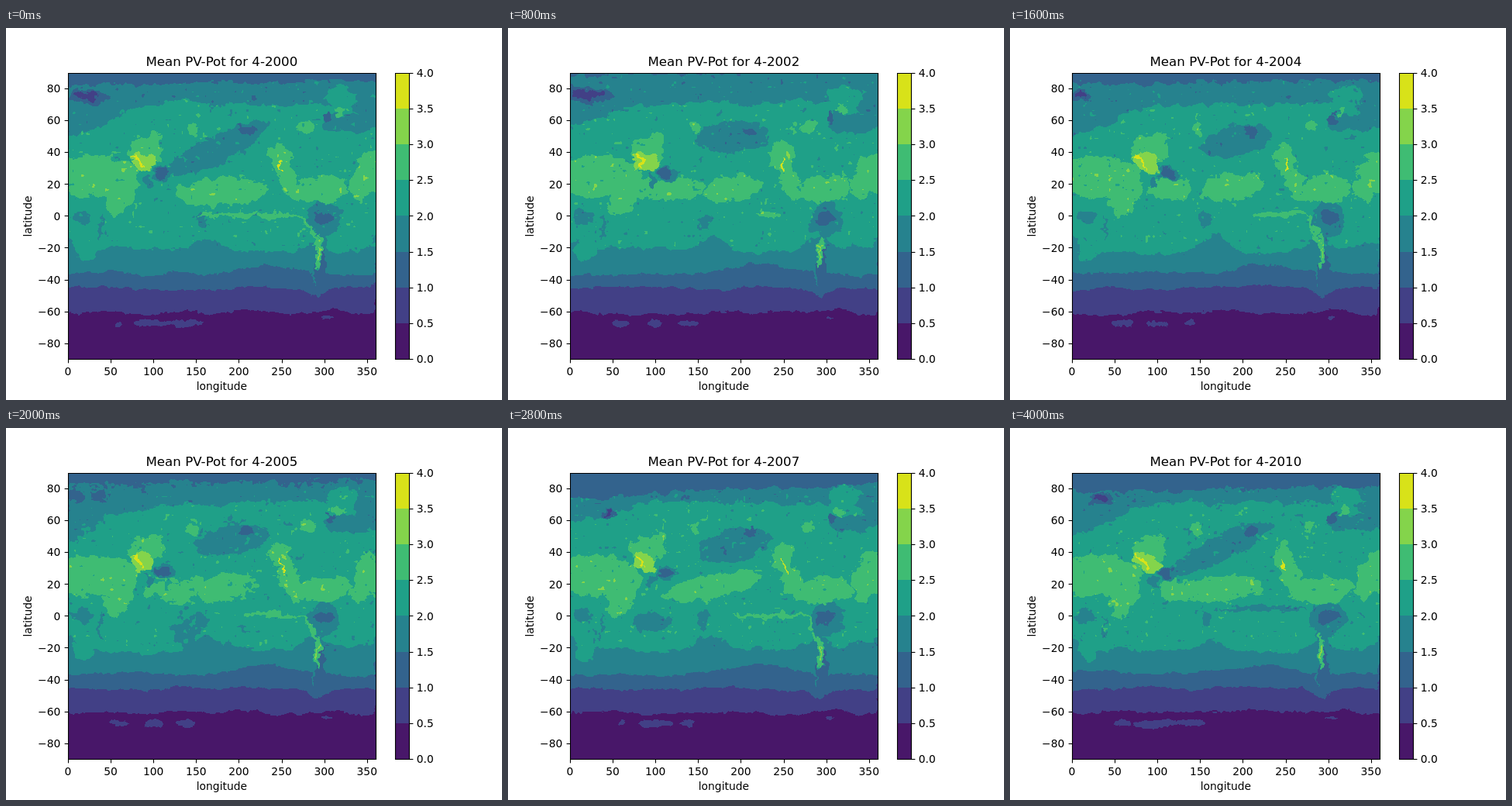
Write an HTML page with a canvas that moves like this. It is 640 by 480 pixels and loops after 4400 ms.

```html
<!DOCTYPE html>
<html lang="en">
<head>
<meta charset="utf-8">
<title>Mean PV-Pot</title>
<style>
html, body { margin: 0; width: 100%; height: 100%; overflow: hidden; background: #fff; }
canvas, svg { position: absolute; left: 0; top: 0; }
canvas { left: 80px; top: 58px; }
text { font-family: "DejaVu Sans", sans-serif; font-size: 13.89px; fill: #000; }
.title { font-size: 16.67px; }
.mid { text-anchor: middle; }
.end { text-anchor: end; }
.line { fill: none; stroke: #000; stroke-width: 1.1; }
</style>
</head>
<body>
<canvas id="map" width="398" height="370"></canvas>
<svg id="plot" width="640" height="480" viewBox="0 0 640 480"></svg>
<script>
const W = 398, H = 370, LEFT = 80, TOP = 58, STEP = 400, FIRST = 2000, YEARS = 11, GREY = 30;
const COLORS = ['#481769', '#424086', '#33638d', '#26828e', '#1fa088', '#3fbc73', '#84d44b', '#d8e219'];
const RGB = COLORS.map(c => [1, 3, 5].map(i => parseInt(c.slice(i, i + 2), 16)));

// Features seen every year: level, centre, radii, tilt.
const africaAsia = [
  [4, 101, 283, 14, 18], [3, 97, 243, 12, 9], [3, 122, 258, 2, 18],
  [5, 112, 191, 58, 27], [5, 150, 210, 18, 36, .35],
  [5, 180, 158, 23, 17], [5, 193, 143, 10, 8], [3, 185, 198, 5, 8],
  [3, 205, 187, 13, 10], [2, 203, 187, 8, 7],
  [6, 177, 173, 17, 12, .4], [7, 170, 172, 11, 2, .9]
];
const americas = [
  [3, 411, 246, 22, 22], [3, 403, 298, 9, 42], [2, 405, 316, 7, 33], [2, 411, 245, 12, 8],
  [5, 402, 289, 4, 23], [6, 402, 290, 1.5, 9],
  [5, 353, 166, 14, 18], [5, 366, 197, 12, 28, -.4], [7, 355, 178, 1.5, 10, -.3],
  [5, 408, 208, 36, 17, -.1], [5, 463, 192, 15, 34, .3], [5, 477, 188, 12, 26]
];
const arctic = [
  [4, 434, 90, 20, 15], [3, 452, 123, 22, 12], [3, 425, 122, 14, 12], [2, 417, 116, 5, 7],
  [5, 430, 107, 6, 6], [5, 388, 128, 9, 7], [5, 240, 131, 6, 7]
];

// drop: extra depth of the northern edge on the left; cap: polar edge, left and right;
// belt: Pacific high; west: width of its western part; strip: equatorial line;
// swath: cloudy mid-latitudes; polar: dark arctic patch; ice: widths of the southern patches.
const MAPS = {};
const year = (n, map) => MAPS[n] = map;
year(2000, { drop: 45, cap: [75, 67], belt: [277, 211, 59, 18, -.08], west: 0, strip: [249, 386],
  swath: [274, 156, 74, 18, -.45], polar: [105, 89, 25, 9], ice: [4, 24, 20] });
year(2002, { drop: 30, cap: [62, 54], belt: [290, 207, 37, 16, -.25], west: 48, strip: [325, 352],
  swath: [290, 141, 48, 20, -.1], polar: [103, 88, 36, 10], ice: [12, 11, 14] });
year(2004, { drop: 40, cap: [73, 67], belt: [287, 206, 42, 18, -.1], west: 28, strip: [310, 386],
  swath: [291, 146, 46, 19, -.2], polar: [90, 87, 14, 9], ice: [13, 14, 8] });
year(2006, { drop: 50, cap: [79, 73], belt: [258, 207, 60, 17, -.2], west: 0, strip: [270, 386],
  swath: [290, 142, 49, 23, -.1], polar: [123, 87, 11, 8], ice: [11, 8, 14],
  extra: [3, 234, 263, 18, 32] });
year(2007, { drop: 25, cap: [91, 70], belt: [263, 204, 63, 16, -.2], west: 0, strip: [284, 386],
  swath: [292, 151, 48, 20, -.2], polar: [131, 111, 9, 6], ice: [3, 22, 8],
  extra: [3, 186, 251, 26, 12] });
year(2009, { drop: 45, cap: [75, 68], belt: [263, 204, 44, 19, -.3], west: 0, strip: [274, 387],
  swath: [300, 148, 41, 28, -.2], polar: [90, 86, 13, 9], ice: [11, 18, 13] });
year(2010, { drop: 40, cap: [82, 76], belt: [265, 208, 62, 16, -.1], west: 15, strip: [270, 386], wet: true,
  swath: [273, 155, 76, 16, -.45], polar: [118, 92, 16, 8], ice: [12, 28, 20] });

function random(seed) {
  return () => {
    seed = seed + 0x6D2B79F5 | 0;
    let t = Math.imul(seed ^ seed >>> 15, seed | 1);
    t ^= t + Math.imul(t ^ t >>> 7, t | 61);
    return ((t ^ t >>> 14) >>> 0) / 4294967296;
  };
}

function noiseField(seed) {
  const next = random(seed), grid = Float32Array.from({ length: 65536 }, () => next() * 2 - 1);
  const at = (a, b) => grid[(b & 255) << 8 | a & 255];
  return (x, y) => {
    const i = Math.floor(x), j = Math.floor(y);
    let u = x - i, v = y - j;
    u *= u * (3 - 2 * u);
    v *= v * (3 - 2 * v);
    const a = at(i, j), b = at(i, j + 1);
    const top = a + (at(i + 1, j) - a) * u, low = b + (at(i + 1, j + 1) - b) * u;
    return top + (low - top) * v;
  };
}

const clamp = (v, lo, hi) => Math.max(lo, Math.min(hi, v));
const bump = (x, at, width) => Math.exp(-(((x - at) / width) ** 2));

function setLevel(ctx, level) {
  const g = level * GREY;
  ctx.fillStyle = `rgb(${g},${g},${g})`;
}

function blob(ctx, [level, x, y, rx, ry, tilt = 0]) {
  setLevel(ctx, level);
  ctx.beginPath();
  ctx.ellipse(x, y, rx, ry, tilt, 0, 7);
  ctx.fill();
}

function fillAbove(ctx, level, edge) {
  setLevel(ctx, level);
  ctx.beginPath();
  ctx.moveTo(60, 40);
  for (let x = LEFT; x <= LEFT + W; x += 3) ctx.lineTo(x, edge(x));
  ctx.lineTo(500, 40);
  ctx.fill();
}

function drawBands(ctx, map, noise) {
  const wave = (x, row) => noise(x / 45, row);
  const [capLeft, capRight] = map.cap;
  fillAbove(ctx, 1, x => 368 - 5 * bump(x, 428, 16) - 3 * bump(x, 290, 50) + 3 * wave(x, 10));
  fillAbove(ctx, 2, x => 336 + 11 * bump(x, 402, 14) + 3 * wave(x, 20));
  fillAbove(ctx, 3, x => 317 - 12 * bump(x, 330, 45) + 3 * wave(x, 30));
  fillAbove(ctx, 4, x => 288 - 18 * bump(x, 80, 14) - 18 * bump(x, 262, 20)
    - 16 * bump(x, 398, 18) - 8 * bump(x, 477, 40) + 5 * wave(x, 40));
  fillAbove(ctx, 3, x => 97 + map.drop * bump(x, 80, 62) + 36 * bump(x, 480, 24) + 4 * wave(x, 50));
  fillAbove(ctx, 2, x => capLeft + (capRight - capLeft) * (x - LEFT) / W + 2 * wave(x, 60));
}

function drawYear(ctx, map) {
  const [from, to] = map.strip;
  const [px, py, prx, pry] = map.polar;
  blob(ctx, [5, ...map.belt]);
  blob(ctx, [5, 206, 208, map.west, 15]);
  blob(ctx, [3, ...map.swath]);
  blob(ctx, [2, 312, 133, 10, 6]);
  blob(ctx, [3, 253, 248, 8, 11]);
  if (map.extra) blob(ctx, map.extra);
  africaAsia.concat(americas, arctic).forEach(shape => blob(ctx, shape));
  blob(ctx, [map.wet ? 3 : 5, (from + to) / 2, map.wet ? 233 : 241.5, (to - from) / 2, 3.5]);
  if (to > 380 && !map.wet) blob(ctx, [5, 393, 262, 3, 23, -.35]);
  blob(ctx, [2, px, py, prx, pry]);
  blob(ctx, [1, px, py - 1, prx * .6, pry * .6]);
  map.ice.forEach((rx, i) => blob(ctx, [1, 146 + 43 * i, 381, rx, 3 + rx / 12]));
  blob(ctx, [1, 414, 374, 6, 2]);
}

function drawLevels(map, noise) {
  const canvas = document.createElement('canvas');
  canvas.width = W;
  canvas.height = H;
  const ctx = canvas.getContext('2d', { willReadFrequently: true });
  ctx.fillRect(0, 0, W, H);
  ctx.translate(-LEFT, -TOP);
  drawBands(ctx, map, noise);
  drawYear(ctx, map);
  return ctx.getImageData(0, 0, W, H).data;
}

// Years without a map of their own lie halfway between their neighbours.
function renderYear(n) {
  const noise = noiseField(n * 7919);
  const pair = MAPS[n] ? [n, n] : [n - 1, n + 1];
  const [a, b] = pair.map(y => drawLevels(MAPS[y], noise));
  const image = new ImageData(W, H);
  for (let y = 0; y < H; y++) {
    const south = clamp((y - 215) / 40, 0, 1);
    const wave = 5 - 2.5 * south, ripple = 2.6 - .8 * south, grain = .68 - .4 * south;
    for (let x = 0; x < W; x++) {
      const shift = o => wave * noise(x / 11 + o, y / 8 + o) + ripple * noise(x / 3.5 + o, y / 3 + 2 * o);
      const sx = clamp(Math.round(x + shift(0)), 0, W - 1);
      const sy = clamp(Math.round(y + .8 * shift(60)), 0, H - 1);
      const k = (sy * W + sx) * 4;
      let value = (a[k] + b[k]) / 2 / GREY;
      if (value > 2.4 && value < 5.4) {
        value += grain * (.7 * noise(x / 8 + 33, y / 6 + 110) + .4 * noise(x / 3 + 7, y / 3 + 61));
      }
      image.data.set([...RGB[clamp(Math.round(value), 0, 7)], 255], (y * W + x) * 4);
    }
  }
  return image;
}

const plot = document.getElementById('plot');

function add(tag, attrs, content = '') {
  const el = document.createElementNS('http://www.w3.org/2000/svg', tag);
  for (const key in attrs) el.setAttribute(key, attrs[key]);
  el.textContent = content;
  return plot.appendChild(el);
}

const snap = v => Math.round(v) + .5;
const label = (x, y, content, cls = '') => add('text', { x, y, class: cls }, content);
const stroke = d => add('path', { d, class: 'line' });

function buildAxes() {
  for (let lon = 0; lon <= 350; lon += 50) {
    const x = 80 + lon * 396.8 / 360;
    stroke(`M${snap(x)} 427.5v4.9`);
    label(x, 447.7, lon, 'mid');
  }
  for (let lat = -80; lat <= 80; lat += 20) {
    const y = 242.4 - lat * 369.6 / 180;
    stroke(`M80.5 ${snap(y)}h-4.9`);
    label(70.3, y + 5.2, String(lat).replace('-', '\u2212'), 'end');
  }
  const level = i => 427.2 - 46.2 * i;
  COLORS.forEach((fill, i) => {
    const y = Math.round(level(i + 1));
    add('rect', { x: 502, y, width: 18.5, height: Math.round(level(i)) - y, fill });
  });
  for (let i = 0; i <= 8; i++) {
    stroke(`M520.5 ${snap(level(i))}h4.9`);
    label(529.8, level(i) + 5.2, (i / 2).toFixed(1));
  }
  stroke('M80.5 58.5H477.5V427.5H80.5Z');
  stroke('M502.5 58.5H520.5V427.5H502.5Z');
  label(278.4, 467, 'longitude', 'mid');
  add('text', { transform: 'translate(32.7 243) rotate(-90)', class: 'mid' }, 'latitude');
}

buildAxes();
const title = label(278.4, 49.3, '', 'title mid');
const screen2d = document.getElementById('map').getContext('2d');
const images = Array.from({ length: YEARS }, (_, i) => renderYear(FIRST + i));
const start = performance.now();
let shown = -1;

function update() {
  const index = Math.floor((performance.now() - start) / STEP) % YEARS;
  if (index !== shown) {
    shown = index;
    screen2d.putImageData(images[index], 0, 0);
    title.textContent = `Mean PV-Pot for 4-${FIRST + index}`;
  }
  requestAnimationFrame(update);
}
update();
</script>
</body>
</html>
```
